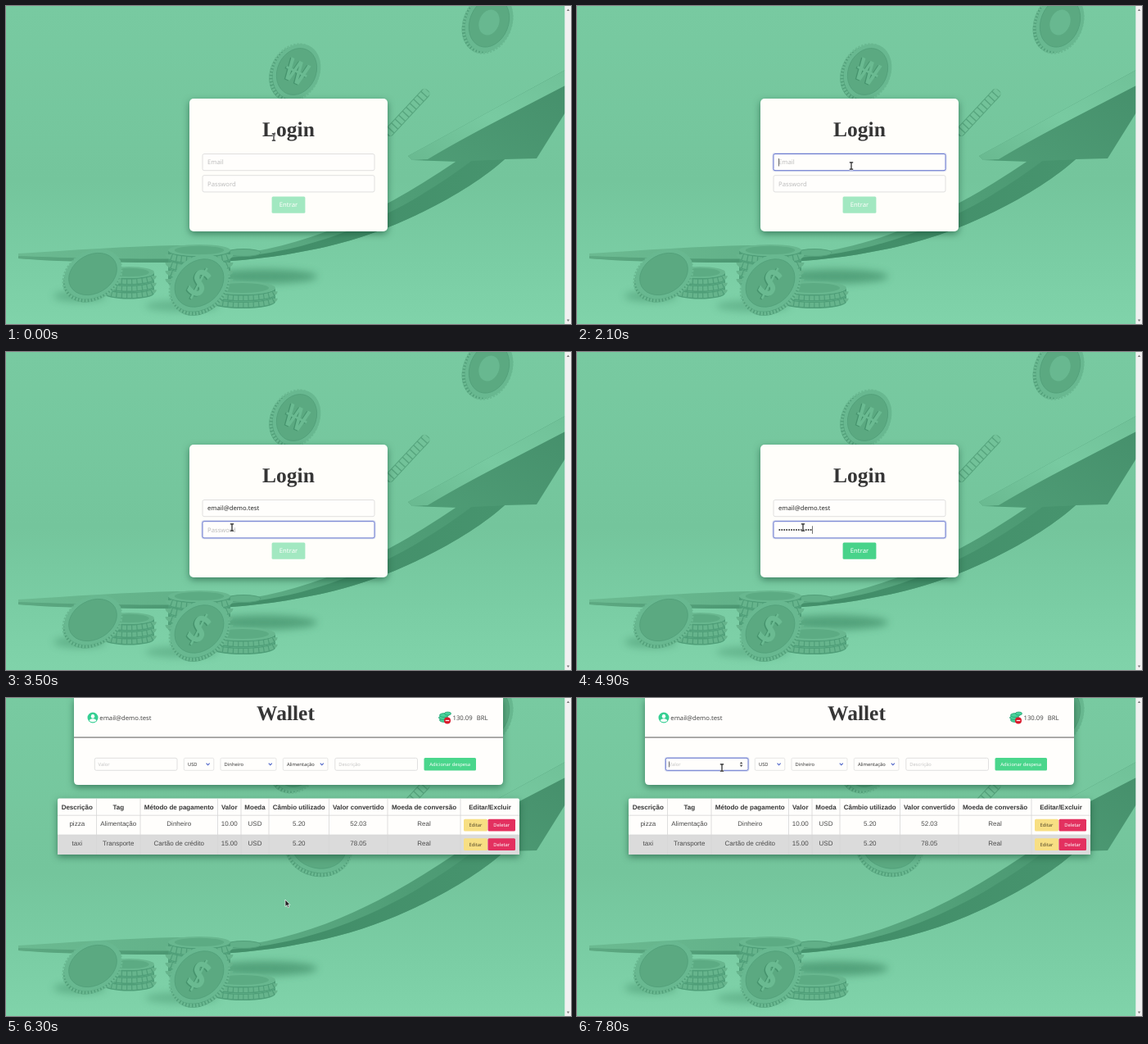
An HTML page for the animation above (8000 ms loop, 690x388 px).

```html
<!DOCTYPE html>
<html lang="pt-BR">
<head>
<meta charset="utf-8">
<title>Wallet</title>
<style>
  html, body { margin: 0; width: 100%; height: 100%; overflow: hidden; background: #78c9a0; }
  svg { display: block; width: 100%; height: 100%; }
  text { font-family: "Noto Sans", "Open Sans", sans-serif; white-space: pre; text-rendering: geometricPrecision; }
  .title { font: bold 25.5px "Liberation Serif", "Times New Roman", serif; fill: #363636; }
  .table text { font: 8px "Liberation Sans", Arial, sans-serif; }
  .table .head { font-weight: bold; }
  .raised { filter: drop-shadow(0 3px 4px rgba(15, 70, 45, .55)); }
</style>
</head>
<body>
<svg viewBox="0 0 690 388" preserveAspectRatio="none">
  <defs>
    <linearGradient id="wall" x1="0" y1="0" x2="0" y2="1">
      <stop offset="0" stop-color="#78caa1"/>
      <stop offset=".55" stop-color="#74c59c"/>
      <stop offset=".8" stop-color="#7acda4"/>
      <stop offset="1" stop-color="#80d3aa"/>
    </linearGradient>
    <linearGradient id="ribbon" gradientUnits="userSpaceOnUse" x1="15" y1="0" x2="610" y2="0">
      <stop offset="0" stop-color="#6bba91"/>
      <stop offset=".45" stop-color="#5fae86"/>
      <stop offset=".8" stop-color="#4f9d76"/>
      <stop offset="1" stop-color="#4b9872"/>
    </linearGradient>
    <linearGradient id="edge" gradientUnits="userSpaceOnUse" x1="15" y1="0" x2="610" y2="0">
      <stop offset="0" stop-color="#5da982"/>
      <stop offset=".5" stop-color="#418d68"/>
      <stop offset="1" stop-color="#47946e"/>
    </linearGradient>
    <linearGradient id="headFace" x1="0" y1="1" x2="1" y2="0">
      <stop offset="0" stop-color="#4f9d76"/>
      <stop offset="1" stop-color="#458f6b"/>
    </linearGradient>
    <linearGradient id="headTop" x1="0" y1="1" x2="1" y2="0">
      <stop offset="0" stop-color="#69b990"/>
      <stop offset=".5" stop-color="#78caa1"/>
      <stop offset="1" stop-color="#70c198"/>
    </linearGradient>
    <filter id="soft" x="-30%" y="-100%" width="160%" height="300%"><feGaussianBlur stdDeviation="5"/></filter>
  </defs>
  <g id="backdrop"></g>
  <g id="page"></g>
  <g id="pointer"></g>
</svg>
<script>
const LOOP = 8000, STEP = 100;
const EMAIL = "email@demo.test";
const SUGGESTIONS = ["alguma@demo.test", EMAIL, "nomequalquer1@demo.test",
  "outroexemplo@demo.test", "conta@demo.test", "umcorreioqualquer@correo.test"];
const byId = id => document.getElementById(id);

// Shape helpers
const rect = (x, y, w, h, fill, extra = "") =>
  `<rect x="${x}" y="${y}" width="${w}" height="${h}" fill="${fill}" ${extra}/>`;
const path = (d, fill, extra = "") => `<path d="${d}" fill="${fill}" ${extra}/>`;
const ellipse = (x, y, rx, ry, fill, extra = "") =>
  `<ellipse cx="${x}" cy="${y}" rx="${rx}" ry="${ry}" fill="${fill}" ${extra}/>`;
const text = (x, y, size, fill, str, extra = "") =>
  `<text x="${x}" y="${y}" font-size="${size}" fill="${fill}" ${extra}>${str}</text>`;
const middle = 'text-anchor="middle"';
const stroke = (color, width) => `stroke="${color}" stroke-width="${width}"`;
const shadow = (x, y, rx, ry, opacity) =>
  ellipse(x, y, rx, ry, "#37845f", `opacity="${opacity}" filter="url(#soft)"`);

function coin(x, y, rx, ry, angle, dx, dy, mark = "") {
  return `<g transform="translate(${x} ${y}) rotate(${angle})">
    ${ellipse(dx, dy, rx, ry, "#519f79")}
    ${ellipse(dx / 2, dy / 2, rx, ry, "none", stroke("#6bba92", 4) + ' stroke-dasharray="2.5 1.5"')}
    ${ellipse(0, 0, rx, ry, "#68b890")}
    ${ellipse(0, 0, rx * .84, ry * .84, "#5ba981", stroke("#52a07a", .8))}
    ${mark}</g>`;
}

// Raised sign: a dark copy below a light one
const sign = (glyph, size) =>
  text(-1.2, size * .36 + 1.2, size, "#46936d", glyph, `${middle} font-weight="bold"`)
  + text(0, size * .36, size, "#6aba91", glyph, `${middle} font-weight="bold"`);

function stack(x, top, rx, ry, count, height) {
  let out = "";
  for (let i = count - 1; i >= 0; i--) {
    const y = top + i * height;
    const side = `M${x - rx} ${y}A${rx} ${ry} 0 0 0 ${x + rx} ${y}`;
    out += path(`${side}v${height}A${rx} ${ry} 0 0 1 ${x - rx} ${y + height}Z`, "#4f9e78")
      + `<g transform="translate(0 ${height / 2})">`
      + path(side, "none", stroke("#66b48c", height - 3) + ' stroke-dasharray="5 1.2"') + "</g>"
      + ellipse(x, y, rx, ry, "#68b78f");
  }
  return out + ellipse(x, top, rx * .8, ry * .75, "#5cab83");
}

function backdrop() {
  const ribs = Array.from({ length: 11 }, (_, i) => rect(-35 + i * 6.6, -5, 5.2, 10, "#72c299")).join("");
  const lower = "L609 187C568 224 482 273 390 294C335 306 280 314 200 313C130 313 60 312 15 308Z";
  return rect(0, 0, 690, 388, "url(#wall)")
    + shadow(315, 330, 65, 9, .6) + shadow(90, 354, 32, 7, .4) + shadow(215, 366, 45, 7, .35)
    + path(`M15 302C80 298 150 293 210 292L300 300C395 284 475 240 552 188${lower}`, "url(#ribbon)")
    + path(`M15 305C90 308 200 310 270 307C390 300 490 248 570 188${lower}`, "url(#edge)")
    + path("M491 183L683 78V130L648 186L609 187L552 190L496 188Z", "url(#headFace)")
    + path("M491 183L683 78V97L600 140Q550 166 515 187L496 188Z", "url(#headTop)")
    + `<g transform="translate(490 130) rotate(-47)">${rect(-37, -6, 74, 12, "#57a57e", 'rx="5"')}${ribs}</g>`
    + coin(590, 20, 28, 37, 22, -3, 3, ellipse(0, 0, 12, 16, "#68b890"))
    + coin(355, 80, 28, 35, 25, -3, 4, sign("₩", 38))
    + coin(382, 181, 40, 32, 12, 0, 5)
    + ellipse(290, 301, 21, 4.5, "#61b088", stroke("#529f79", 1))
    + stack(236, 298, 38, 7, 4, 10)
    + stack(150, 325, 31, 7, 3, 8.5)
    + coin(106, 327, 37, 28, -30, -3, 3)
    + stack(289, 344, 40, 8, 2, 8.5)
    + coin(236, 338, 39, 31, -42, -3, 4,
      `<g transform="rotate(70) scale(.85 1.15)">${sign("$", 45)}</g>`)
    + rect(682.3, 0, 7.7, 388, "#f1f1f1")
    + path("M684.8 6L686.5 3.6L688.2 6ZM684.8 382.5L686.5 385L688.2 382.5Z", "#777");
}

// Timeline: [time, x, y] of the pointer's hot spot
const TRACK = [[0, 327, 160], [1400, 327, 160], [1600, 333, 190], [1700, 335, 208], [1900, 335, 195],
  [2300, 335, 195], [2400, 336, 194], [2600, 336, 194], [3000, 276, 214], [5900, 276, 214],
  [6200, 341, 246], [6300, 341, 246], [6800, 350, 238], [7100, 524, 142], [7300, 370, 100],
  [7500, 177, 85], [LOOP, 177, 85]];

function pointerAt(t) {
  const i = TRACK.findIndex(key => key[0] > t);
  const [t0, x0, y0] = TRACK[i - 1], [t1, x1, y1] = TRACK[i];
  const k = (t - t0) / (t1 - t0), ease = k * k * (3 - 2 * k);
  return { x: x0 + (x1 - x0) * ease, y: y0 + (y1 - y0) * ease };
}

const EMAIL_BOX = [240, 180.5, 210, 20.2], PASS_BOX = [240, 206.7, 210, 20.2];
const ENTER_BOX = [324.6, 232.5, 40.8, 20.2], TITLE_BOX = [313, 138, 64, 26];
const VALUE_BOX = [108.3, 73.3, 100.7, 15], NOTE_BOX = [401.8, 73.3, 100.7, 15];
const inside = ({ x, y }, [bx, by, w, h]) => x >= bx && x <= bx + w && y >= by && y <= by + h;

function field([x, y, w, h], focused, hovered) {
  const color = focused ? "#6c7bd0" : hovered ? "#b9b9b9" : "#d9d9d9";
  const glow = focused ? rect(x - .6, y - .6, w + 1.2, h + 1.2, "none", 'rx="2.5" ' + stroke("#485fc7", 1.6) + ' opacity=".25"') : "";
  return glow + rect(x, y, w, h, "#fffefc", `rx="2" ${stroke(color, focused ? 1 : .8)}`);
}
const caret = (x, y, h) => rect(x, y, .7, h, "#333", 'class="caret"');
const button = (x, y, w, h, fill, label, size, color, extra = "") =>
  `<g ${extra}>${rect(x, y, w, h, fill, 'rx="1.5"')}${text(x + w / 2, y + h / 2 + size * .36, size, color, label, middle)}</g>`;

function suggestions(t) {
  if (t < 2200 || t >= 2500) return "";
  const fading = t >= 2400;
  const rows = SUGGESTIONS.map((mail, i) => {
    const y = 209 + i * 18.4;
    const shade = i === 1 && t === 2300 ? rect(292, y, 119.5, 18.4, "#e4e4e4") : "";
    return shade + text(298, y + 11.8, 6.7, "#333", mail, fading ? 'opacity=".65"' : "");
  }).join("");
  return rect(292, 209, 119.5, 111.5, "#fff", fading ? 'opacity=".38"' : "") + rows;
}

function loginPage(t, at) {
  const filled = t >= 2300;
  const dots = t < 4200 ? 0 : t < 4400 ? 2 : Math.min(20, 4 + 2 * (t - 4400) / STEP);
  const onEmail = t >= 2100 && t < 2900, onPass = t >= 2900 && t < 6200;
  const passCaret = onPass && !(t >= 3500 && t < 4100) && t < 5800;
  const ready = dots >= 6, pitch = 2.95;
  const secret = Array.from({ length: dots }, (_, i) => ellipse(247.3 + i * pitch, 217, 1, 1, "#333")).join("");
  return rect(224, 113, 242, 162, "#fffefa", 'rx="5" class="raised"')
    + `<text x="345" y="158.7" class="title" ${middle}>Login</text>`
    + field(EMAIL_BOX, onEmail, inside(at, EMAIL_BOX))
    + text(246, 193.3, 7.7, filled ? "#2b2b2b" : "#bdbdbd", filled ? EMAIL : "Email", 'id="email"')
    + (onEmail ? caret(246, 186, 9.5) : "")
    + field(PASS_BOX, onPass, inside(at, PASS_BOX))
    + (dots ? secret : text(246, 219.6, 7.7, "#bdbdbd", "Password"))
    + (passCaret ? caret(246 + dots * pitch, 212.3, 9.5) : "")
    + button(...ENTER_BOX, ready && inside(at, ENTER_BOX) ? "#3dcb80" : "#48d38a", "Entrar", 7.7, "#fff", ready ? "" : 'opacity=".5"')
    + suggestions(t);
}

function select(x, w, label) {
  return rect(x, 73.3, w, 15, "#fffefc", `rx="1.5" ${stroke("#dbdbdb", .7)}`)
    + text(x + 4.6, 82.9, 5.8, "#363636", label)
    + path(`M${x + w - 9.2} 79.6l2 2.2l2 -2.2`, "none", stroke("#485fc7", 1.1));
}

const COLUMNS = [63, 110.5, 164, 258.5, 287, 321, 394.5, 466, 555, 627];
const HEADINGS = ["Descrição", "Tag", "Método de pagamento", "Valor", "Moeda",
  "Câmbio utilizado", "Valor convertido", "Moeda de conversão", "Editar/Excluir"];
const EXPENSES = [
  ["pizza", "Alimentação", "Dinheiro", "10.00", "USD", "5.20", "52.03", "Real"],
  ["taxi", "Transporte", "Cartão de crédito", "15.00", "USD", "5.20", "78.05", "Real"]];

function table() {
  const row = (cells, y, fill, extra) => cells.map((cell, i) =>
    text((COLUMNS[i] + COLUMNS[i + 1]) / 2, y, 8, fill, cell, `${middle} ${extra}`)).join("");
  const actions = [147.8, 171.3].map(y =>
    button(559, y, 29, 14.6, "#f8df83", "Editar", 5.8, "#54492a")
    + button(588.5, y, 33.5, 14.6, "#e3305f", "Deletar", 5.8, "#fff")).join("");
  return `<g class="table"><g class="raised">${rect(63, 122.5, 564, 68.5, "#fffefc", 'rx="2"')}</g>`
    + rect(63, 167, 564, 24, "#dbdbdb")
    + path(COLUMNS.slice(1, -1).map(x => `M${x} 123V191`).join("") + "M63 143.2H627M63 167H627", "none", stroke("#d6d6d6", .8))
    + row(HEADINGS, 135.5, "#363636", 'class="head"')
    + row(EXPENSES[0], 156, "#4a4a4a", "") + row(EXPENSES[1], 179.6, "#4a4a4a", "")
    + "</g>" + actions;
}

function walletPage(t, at) {
  const focused = t >= 7700, hovered = inside(at, VALUE_BOX);
  const coins = [28, 25, 22].map((y, i) => ellipse(535 - i % 2, y - 1, 5.5, 2.4, "#48d39b", stroke("#1f9a6c", .7))).join("");
  return path("M83 0H607V101Q607 106 602 106H88Q83 106 83 101Z", "#fffefc", 'class="raised"')
    + ellipse(106, 24, 6.5, 6.5, "#35cf92")
    + ellipse(106, 22.2, 2.2, 2.5, "#fff") + path("M101.8 28Q102 25.2 106 25.2T110.2 28Q106 30.6 101.8 28Z", "#fff")
    + text(114.3, 27, 7.7, "#4a4a4a", EMAIL)
    + `<text x="341.5" y="27" class="title" ${middle}>Wallet</text>`
    + coins + ellipse(539.5, 19, 4, 2, "#48d39b", stroke("#1f9a6c", .7))
    + ellipse(539, 27.5, 4, 4, "#d9182b") + rect(536.7, 26.9, 4.6, 1.2, "#fff")
    + text(545.5, 27, 7.7, "#4a4a4a", "130.09") + text(588.5, 27, 7.7, "#4a4a4a", "BRL", 'text-anchor="end"')
    + rect(83, 47.6, 524, .9, "#454545")
    + field(VALUE_BOX, focused, hovered) + text(112.6, 82.9, 5.8, "#c4c4c4", "Valor")
    + (hovered ? path("M198.8 80.3L200.6 78L202.4 80.3ZM198.8 81.7L200.6 84L202.4 81.7Z", "#444") : "")
    + (t >= 7800 ? caret(112.3, 77.4, 7) : "")
    + select(217.3, 36.5, "USD") + select(262, 68, "Dinheiro") + select(338.3, 54.7, "Alimentação")
    + field(NOTE_BOX, false, inside(at, NOTE_BOX)) + text(406.3, 82.9, 5.8, "#c4c4c4", "Descrição")
    + button(510.5, 73, 63.5, 15.5, "#4ad68c", "Adicionar despesa", 5.8, "#fff")
    + table();
}

const CURSORS = {
  beam: path("M-2.2 -4.2H2.2M-2.2 4.2H2.2M0 -4.2V4.2", "none", stroke("#fff", 2.6))
    + path("M-2.2 -4.2H2.2M-2.2 4.2H2.2M0 -4.2V4.2", "none", stroke("#222", 1.2)),
  arrow: path("M0 0V8.6L2 6.8L3.4 9.8L4.8 9.2L3.5 6.3H6Z", "#222", stroke("#fff", .7)),
  hand: path("M-.9 0Q0 -1 .9 0V3.2L4.4 4Q5.6 4.4 5.4 6L4.6 9.3H-.4L-3.2 5.8Q-2.6 4.6 -.9 6Z", "#fff", stroke("#222", .8))
};

function cursorFor(at, login) {
  if (login && inside(at, ENTER_BOX)) return "hand";
  const boxes = login ? [EMAIL_BOX, PASS_BOX, TITLE_BOX] : [VALUE_BOX, NOTE_BOX];
  return boxes.some(box => inside(at, box)) ? "beam" : "arrow";
}

function render(t) {
  const at = pointerAt(t), login = t < 6300;
  byId("page").innerHTML = login ? loginPage(t, at) : walletPage(t, at);
  if (t >= 2300 && t < 2900) {
    document.querySelector(".caret").setAttribute("x", 246.3 + byId("email").getComputedTextLength());
  }
  byId("pointer").innerHTML = CURSORS[cursorFor(at, login)];
  byId("pointer").setAttribute("transform", `translate(${at.x} ${at.y})`);
}

byId("backdrop").innerHTML = backdrop();
const start = performance.now();
let shown = -1;
function tick() {
  const t = Math.floor((performance.now() - start) % LOOP / STEP) * STEP;
  if (t !== shown) render(shown = t);
  requestAnimationFrame(tick);
}
tick();
</script>
</body>
</html>
```
